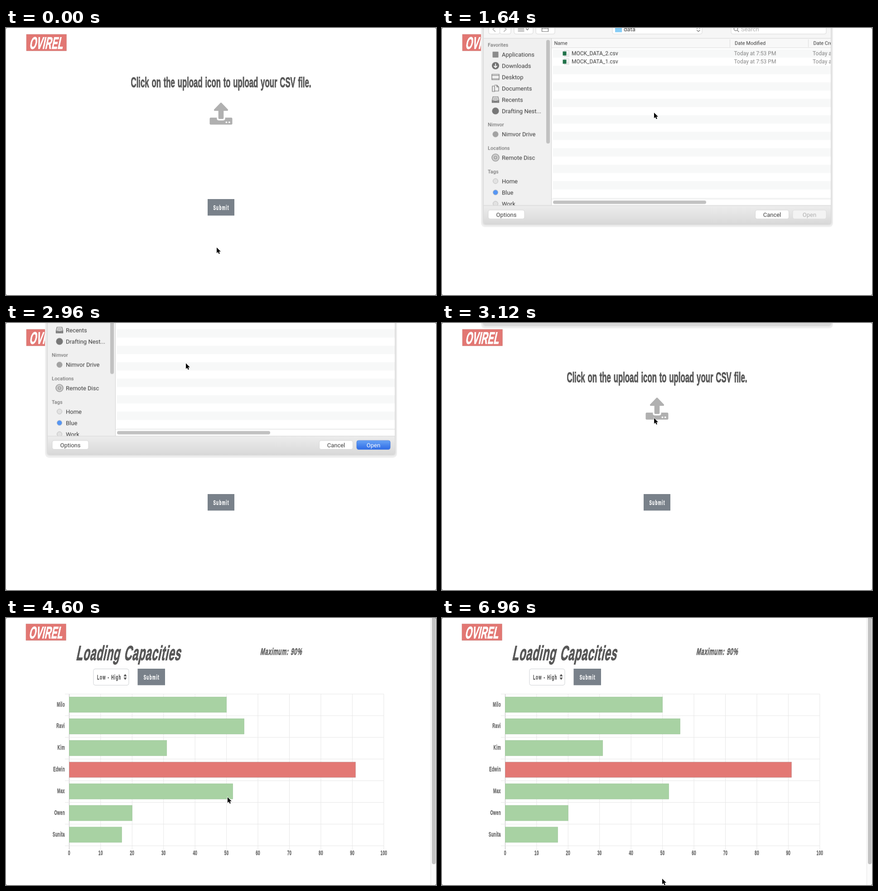
Recreate the animation shown at these times as an HTML page. Size 949x590 px, loop 7000 ms.

```html
<!DOCTYPE html>
<html lang="en">
<head>
<meta charset="utf-8">
<title>Loading capacities</title>
<style>
html, body { margin: 0; width: 100%; height: 100%; overflow: hidden; background: #fff; }
svg { display: block; width: 949px; height: 590px; }
.gothic { font-family: "Liberation Sans", Arial, sans-serif; font-weight: 700; word-spacing: .065em; stroke: currentColor; stroke-width: .03em; fill: currentColor; }
.ui { font-family: Roboto, "Liberation Sans", sans-serif; font-size: 13px; fill: #3b3b3b; }
.small { font-size: 12px; }
.tiny { font-size: 11px; }
.head { font-size: 11px; font-weight: 500; fill: #7c7c7c; }
.mid { text-anchor: middle; }
.white { filter: brightness(0) invert(1); }
.line { fill: none; stroke: #6f6f6f; stroke-width: 1.2; stroke-linecap: round; stroke-linejoin: round; }
.btn { fill: #fff; stroke: #d0d0d0; stroke-width: .8; }

#home, #chart, #gate, #sheet, #picked, #pale, #arrow, #hand, #cursor, .bar { animation: 7s linear infinite; }
#home { animation-name: home; }
#chart { animation-name: chart; }
#gate { animation-name: gate; }
#sheet { animation-name: slide; }
#picked { animation-name: pick; }
#pale { animation-name: pale; }
#cursor { animation-name: move; }
#arrow { animation-name: arrow; }
#hand { animation-name: hand; }
.bar { animation-name: grow; transform-origin: 139.5px 0; }

@keyframes home { 0%, 58.2% { opacity: 1 } 58.22%, 100% { opacity: 0 } }
@keyframes chart { 0%, 58.2% { opacity: 0 } 58.22%, 100% { opacity: 1 } }
@keyframes gate {
  0%, 19.94% { opacity: 0 } 19.95%, 45.1% { opacity: 1 } 45.11%, 100% { opacity: 0 }
}
@keyframes slide {
  0%, 19.07% { transform: translateY(-443px); animation-timing-function: cubic-bezier(.37,0,.63,1) }
  23.93%, 40.59% { transform: none; animation-timing-function: cubic-bezier(.37,0,.63,1) }
  44.85%, 100% { transform: translateY(-443px) }
}
@keyframes pick { 0%, 37.09% { opacity: 0 } 37.1%, 100% { opacity: 1 } }
@keyframes pale { 0%, 20.5% { opacity: .85 } 20.51%, 100% { opacity: 0 } }
@keyframes arrow {
  0%, 15.95% { opacity: 1 } 15.96%, 21.1% { opacity: 0 } 21.11%, 100% { opacity: 1 }
}
@keyframes hand {
  0%, 15.95% { opacity: 0 } 15.96%, 21.1% { opacity: 1 } 21.11%, 100% { opacity: 0 }
}
@keyframes grow {
  0%, 58.1% { transform: scaleX(0); animation-timing-function: cubic-bezier(.165,.84,.44,1) }
  65.6%, 100% { transform: none }
}
@keyframes move {
  0%, .4% { transform: translate(465px,485px) }
  2.29%, 4.3% { transform: translate(458px,395px); animation-timing-function: ease-in }
  7.4% { transform: translate(424px,295px) }
  9.7% { transform: translate(416px,222px) }
  11.9% { transform: translate(456px,176px); animation-timing-function: ease-out }
  13.71%, 27.1% { transform: translate(468px,187px); animation-timing-function: ease-in-out }
  33.7% { transform: translate(398px,91px) }
  36%, 42.4% { transform: translate(397px,89px); animation-timing-function: ease-in }
  44.57% { transform: translate(468px,209.5px) }
  47.4% { transform: translate(480px,330px); animation-timing-function: ease-out }
  53%, 57.2% { transform: translate(485px,397px) }
  64%, 88.6% { transform: translate(489px,396px); animation-timing-function: cubic-bezier(.4,.2,.75,.75) }
  99.4%, 100% { transform: translate(486px,576px) }
}
</style>
</head>
<body>
<svg viewBox="0 0 949 590">
  <defs>
    <linearGradient id="foot" x2="0" y2="1"><stop stop-color="#ededed"/><stop offset="1" stop-color="#d9d9d9"/></linearGradient>
    <linearGradient id="blue" x2="0" y2="1"><stop stop-color="#67a3f6"/><stop offset="1" stop-color="#2f6ce6"/></linearGradient>
    <clipPath id="side"><path d="M92 0H241V403H92Z"/></clipPath>
    <clipPath id="list"><path d="M242 0H858V389H242Z"/></clipPath>
    <filter id="soft" x="-5%" y="-5%" width="110%" height="110%"><feGaussianBlur stdDeviation="2"/></filter>
  </defs>
  <path fill="#fff" d="M0 0H949V590H0Z"/>
  <g id="home"></g>
  <g id="chart"></g>
  <g id="gate"><g id="sheet"></g></g>
  <g id="cursor">
    <path id="arrow" d="M0 0V12.4L2.8 9.8 4.8 14.2 6.9 13.3 5 9H8.9Z" stroke="#fff" stroke-width="1.4" paint-order="stroke"/>
    <g id="hand" fill="#fff" stroke="#222" stroke-width="1.1" stroke-linejoin="round">
      <path d="M-2.4 2Q-2.6.6-1.2.6T.5 2L1.4 5.8Q3 5 4 6.2 5.6 5.6 6.4 6.8 8.4 6.6 8.6 9V12L7.4 15.6H.6L-4 10.6Q-5 9.2-3.8 8.6-2.6 8.2-1.2 9.4Z"/>
      <path d="M2 9.6V13M4.1 9.6V13M6.2 9.6V13" stroke-width=".8"/>
    </g>
  </g>
  <path fill="#8a8a8a" d="M0 0H2L0 2ZM949 0H947L949 2ZM0 590H2L0 588ZM949 590H947L949 588Z"/>
</svg>
<script>
const put = (id, ...parts) => document.getElementById(id).innerHTML = parts.flat().join('');
const rect = (x, y, w, h, fill, more = '') => `<rect x="${x}" y="${y}" width="${w}" height="${h}" fill="${fill}" ${more}/>`;
const path = (d, more = 'class="line"') => `<path d="${d}" ${more}/>`;
const ui = (x, y, s, cls = '') => `<text class="ui ${cls}" x="${x}" y="${y}">${s}</text>`;

// Condensed display face: one shared narrowing, optional slant
const gothic = (x, y, size, s, {color = '#585858', anchor = 'start', gap = 0, slant = 0} = {}) =>
  `<text class="gothic" transform="translate(${x} ${y}) skewX(${-slant}) scale(.525 1)" font-size="${size}"
    text-anchor="${anchor}" letter-spacing="${gap}" style="color:${color}">${s}</text>`;

const logo = (x, y) => rect(x, y, 88.5, 36.5, '#e27773', 'stroke="#c98a88" stroke-width=".6"') +
  gothic(x + 6, y + 32, 37, 'OVIREL', {color: '#fff', slant: 12, gap: .6});
const submit = (x, y, w) => rect(x, y, w, 36.5, '#79818a') +
  gothic(x + w / 2 + .6, y + 23.5, 15.5, 'Submit', {color: '#fff', anchor: 'middle', gap: 2.5});

put('home',
  logo(45, 14),
  gothic(474.5, 131, 32, 'Click on the upload icon to upload your CSV file.', {anchor: 'middle'}),
  `<g fill="#b0b0b0">
    <rect x="449.5" y="198" width="50" height="15.6" rx="2.4"/>
    <path d="M465.3 197V199.5Q465.3 204.3 470 204.3H479Q483.7 204.3 483.7 199.5V197Z" fill="#fff"/>
    <path d="M473.2 165.4Q474.5 164.2 475.8 165.4L489.6 179.8Q491 182.7 488.4 183H480.3V199Q480.3 201 478.3 201H470.7Q468.7 201 468.7 199V183H460.6Q458 182.7 459.4 179.8Z"/>
    <g fill="#fff"><circle cx="486.5" cy="208.3" r="1.9"/><circle cx="492.8" cy="208.3" r="1.9"/></g>
  </g>`,
  submit(445, 378, 59));

// Chart page
const people = [['Milo', 50], ['Ravi', 55.6], ['Kim', 31], ['Edwin', 91], ['Max', 52], ['Owen', 20], ['Sunita', 16.7]];
const left = 139.5, top0 = 168, unit = 6.943, row = 47.9;
const grid = [];
for (let i = 0; i <= 10; i++) {
  const x = left + i * 10 * unit;
  grid.push(path(`M${x} ${top0}V512`, `stroke="${i ? '#e7e7e7' : '#bdbdbd'}"`),
    gothic(x, 524, 15.5, i * 10, {color: '#666', anchor: 'middle', gap: .6}));
}
for (let i = 0; i <= people.length; i++) grid.push(path(`M130 ${top0 + i * row}H833.8`, 'stroke="#e7e7e7"'));

put('chart',
  logo(44, 13),
  gothic(154, 93, 45, 'Loading Capacities', {gap: 1.4, slant: 12}),
  gothic(560.5, 82, 22, 'Maximum: 90%', {gap: 1.3, slant: 12}),
  rect(193, 112.5, 78, 36, '#fff', 'rx="4" stroke="#cfd2d5"'),
  gothic(201, 135.5, 15.5, 'Low - High', {gap: 2.1}),
  path('M259.5 129L263 123.5 266.5 129ZM259.5 131.5H266.5L263 137Z', 'fill="#555"'),
  submit(290.5, 112, 60.5),
  grid,
  people.map(([name, v], i) => {
    const y = top0 + i * row, hot = v > 90;
    return gothic(130, y + 27.5, 15.5, name, {color: '#666', anchor: 'end', gap: .7}) +
      rect(left, y + 6.5, v * unit, 34, hot ? '#e37874' : '#a8d2a3', `class="bar" stroke="${hot ? '#b99393' : '#9fc59c'}" stroke-width=".7"`);
  }),
  rect(937, 0, 12, 590, '#fbfbfb'),
  path('M937.5 0V590', 'stroke="#e6e6e6"'),
  rect(940, -6, 8.3, 550, '#c3c3c3', 'rx="4"'));

// File dialog
const stripes = [...Array(10)].map((_, i) => rect(245, 58 + i * 36.4, 613, 18.2, '#f7f8f8'));
const sideItems = ['Applications', 'Downloads', 'Desktop', 'Documents', 'Recents', 'Drafting Nest...'];
const dates = y => [644.5, 818].map(x => ui(x, y, 'Today at 7:53 PM', 'small')).join('');
const fileName = (n, y) => ui(286, y, `MOCK_DATA_${n}.csv`, 'small');
const fileIcon = y => rect(270, y, 10, 13, '#fafafa', 'stroke="#c9c9c9" stroke-width=".8"') +
  rect(266.5, y + 2, 8, 9, '#1f7148') + path(`M276 ${y + 8}H278.5M276 ${y + 10.5}H278.5`, 'stroke="#bbb"');
const dot = (y, fill, r = 5.5) => `<circle cx="118" cy="${y}" r="${r}" fill="${fill}" stroke="#b3b3b3" stroke-width=".8"/>`;
const button = (x, w, s) => rect(x, 413, w, 19.5, '#fff', 'class="btn" rx="4"') + ui(x + w / 2, 427.7, s, 'mid');

put('sheet',
  rect(86, -20, 777, 471, '#f1f1f1', 'rx="9"'),
  rect(91, -20, 768, 465, '#cbcbcb', 'rx="4" filter="url(#soft)"'),
  rect(92, -20, 766, 463, '#f0f0f0'),
  rect(92, -20, 766, 54, '#f6f6f6'),
  path('M92 33.5H858', 'stroke="#d6d6d6"'),
  [[103, 24.5], [127.5, 24.5], [159, 42], [207, 42], [376, 198], [638, 210]].map(([x, w]) => rect(x, 3, w, 21, '#fff', 'class="btn" rx="4"')),
  path('M117.5 8.5L112 13.5 117.5 18.5M136.5 8.5L142 13.5 136.5 18.5', 'class="line" style="stroke:#999"'),
  path('M168 9H181M168 12H181M168 15H181M168 18H181M185.5 12L188.3 15 191 12'),
  path('M220.5 18.5V8.5H225L226.5 10H230M220.5 12H234.5V18.5H220.5M234 6V11M231.5 8.5H236.5'),
  path('M382 8Q382 7 383 7H387L388.5 8.5H396Q397 8.5 397 9.5V19Q397 20 396 20H383Q382 20 382 19Z', 'fill="#69bcee"'),
  rect(382, 10.5, 15, 9.5, '#86cdf6', 'rx="1"'),
  ui(401, 18, 'data'),
  path('M562.5 11.5L565.7 8.3 569 11.5M562.5 15.5L565.7 18.7 569 15.5'),
  '<circle class="line" cx="648.5" cy="12.5" r="4.2"/>', path('M651.8 15.8L655 19'),
  `<g style="opacity:.4">${ui(660, 18, 'Search')}</g>`,

  '<g clip-path="url(#side)">',
  ui(101, 52, 'Favorites', 'head'),
  sideItems.map((s, i) => ui(132, 74 + i * 25, s)),
  rect(111.5, 63, 13, 13, '#8b8b8b', 'rx="1"'),
  '<circle cx="118" cy="94" r="8" fill="#707070"/>',
  path('M118 90V98M114.8 95L118 98.2 121.2 95', 'class="line" style="stroke:#fff;stroke-width:1.8"'),
  path('M110 113H126V125H110ZM110 115.5H126M110 123H126'),
  path('M111 139H116V151H111ZM116 137H121L125 141V150H116M121 137V141H125'),
  rect(111, 171, 14, 4, '#8a8a8a'),
  path('M112.5 162.5H123.5L125.5 171V175.5H110.5V171ZM110.5 171H114.5L116 173H120L121.5 171H125.5M114 165.5H122M113.5 168.5H122.5'),
  '<circle cx="118" cy="194" r="7.6" fill="#777"/>',
  ui(101, 228, 'Nimvor', 'head'),
  '<circle cx="118" cy="245.5" r="6.5" fill="#a2a2a2"/>',
  ui(132, 250, 'Nimvor Drive'),
  ui(101, 280, 'Locations', 'head'),
  dot(297, '#cfcfcf', 8), '<g style="opacity:.7"><circle class="line" cx="118" cy="297" r="8"/><circle class="line" cx="118" cy="297" r="3"/></g>',
  ui(132, 302, 'Remote Disc'),
  ui(101, 332, 'Tags', 'head'),
  ['Home', 'Blue', 'Work'].map((s, i) => dot(349 + i * 25, i === 1 ? '#5596f5' : '#e2e2e2') + ui(132, 354 + i * 24.8, s)),
  rect(230, 37, 8, 229, '#c1c1c1', 'rx="4"'),
  '</g>',

  rect(241.5, 34, 616.5, 369, '#fff'),
  path('M241.5 34V403', 'stroke="#d3d3d3"'),
  '<g clip-path="url(#list)">',
  rect(242, 34, 616, 20, '#f8f8f8'),
  path('M242 54.5H858M635.5 36V53M808.5 36V53', 'stroke="#dcdcdc"'),
  ui(247.5, 48, 'Name', 'tiny'), ui(646, 48, 'Date Modified', 'tiny'), ui(819.5, 48, 'Date Created', 'tiny'),
  stripes,
  `<g style="opacity:.62">${dates(71.3)}${dates(89.4)}</g>`,
  fileName(2, 71.3), fileName(1, 89.4),
  fileIcon(60.5), fileIcon(78.7),
  '</g>',
  path('M242 388.5H858', 'stroke="#e4e4e4"'),
  rect(245, 392, 338, 7.5, '#c1c1c1', 'rx="3.7"'),

  rect(92, 403, 766, 40, 'url(#foot)'),
  rect(92, 403, 766, 40, '#fff', 'id="pale"'),
  path('M92 403H858', 'stroke="#d2d2d2"'),
  button(102, 80, 'Options'),
  button(691.5, 74, 'Cancel'),
  rect(774, 413, 74, 19.5, '#f3f3f3', 'rx="4" stroke="#d8d8d8" stroke-width=".8"'),
  `<g style="opacity:.36">${ui(811, 427.7, 'Open', 'mid')}</g>`,
  '<g id="picked">',
  rect(242, 76.2, 616, 18.2, '#0b62d6'),
  `<g clip-path="url(#list)" class="white">${fileName(1, 89.4)}${dates(89.4)}</g>`,
  fileIcon(78.7),
  rect(774, 413, 74, 19.5, 'url(#blue)', 'rx="4" stroke="#3f78dd" stroke-width=".8"'),
  `<g class="white">${ui(811, 427.7, 'Open', 'mid')}</g>`,
  '</g>');
</script>
</body>
</html>
```
